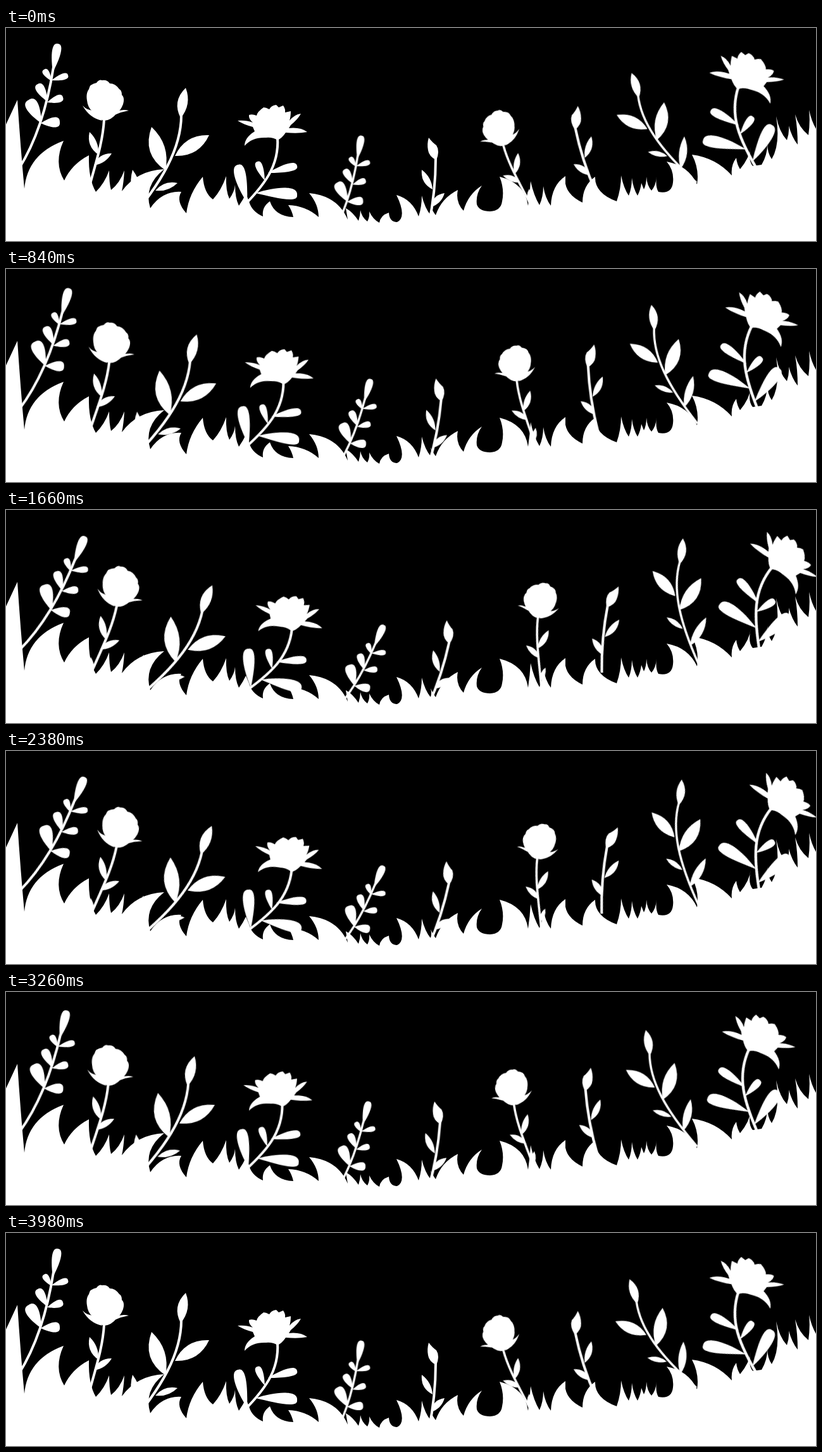
Animation of 1280x338 px, one loop 4000 ms. Source, as an HTML page:

```html
<!DOCTYPE html>
<html lang="en">
<head>
<meta charset="utf-8">
<title>Swaying meadow</title>
<style>
  html, body { margin: 0; width: 100%; height: 100%; overflow: hidden; background: #000; }
  svg { display: block; width: 100%; height: 100%; fill: #fff; }
  .stem { fill: none; stroke: #fff; stroke-width: 4; }
  .plant { animation: sway 4s cubic-bezier(.37, 0, .63, 1) infinite; }
  @keyframes sway {
    0% { transform: rotate(0deg); }
    50% { transform: rotate(var(--lean)); }
    100% { transform: rotate(var(--rest)); }
  }
</style>
</head>
<body>
<svg viewBox="0 0 1280 338">
  <g id="meadow"></g>
  <path d="M0 338V153L18 114Q23 190 29 255Q34 200 91 179Q75 214 92 242Q104 216 131 202Q130 240 142 260Q156 246 163 226Q163 246 166 257Q180 246 187 226Q186 246 183 259Q207 226 250 224Q217 250 228 286Q247 258 277 260Q268 275 285 294Q289 262 311 236Q313 262 327 272Q340 258 348 235Q347 258 353 271Q361 260 362 249Q362 270 368 282Q375 272 379 263L384 275Q388 291 406 299Q404 284 417 275Q425 299 454 300Q452 290 446 281Q474 282 494 300V338Z"/>
  <path d="M494 338V300Q494 280 479 262Q524 266 540 304L537 286Q548 292 557 306Q560 297 560 289Q562 300 571 307Q575 300 574 291Q580 304 590 309Q592 297 605 293Q606 308 618 308Q634 300 617 265Q642 272 652 299Q657 284 657 266Q662 286 671 297Q673 290 671 283Q675 292 679 297Q688 270 714 257Q710 276 723 290Q730 264 752 250Q742 264 744 280Q748 291 765 291Q782 290 784 275Q788 256 780 236Q820 246 825 282Q828 262 829 243Q834 266 843 281Q849 268 849 251Q852 270 861 282Q862 250 884 235V338Z"/>
  <path d="M884 338V235Q880 262 911 277Q911 250 931 236Q930 262 965 275Q972 255 972 234Q976 254 984 266Q989 254 989 238Q991 254 998 266Q1003 256 1004 246L1008 256Q1012 248 1012 236Q1013 250 1020 258Q1027 250 1028 236Q1026 252 1031 260Q1052 264 1054 245Q1056 226 1044 212Q1078 218 1092 248Q1096 224 1084 201Q1122 206 1147 234Q1145 218 1154 206Q1155 216 1160 224Q1175 206 1177 188Q1172 210 1180 219L1194 217Q1204 200 1203 182Q1203 198 1210 208Q1224 185 1217 140Q1222 165 1234 178Q1238 166 1237 155Q1242 174 1251 185Q1251 160 1247 137Q1253 158 1268 170Q1271 150 1269 130Q1273 148 1280 160V338Z"/>
</svg>
<script>
const shape = d => `<path d="${d}"/>`;
const stem = d => `<path class="stem" d="${d}"/>`;

// Point at fraction t of the line a-b, pushed sideways by off.
const beside = (ax, ay, bx, by) => (t, off) => {
  const dx = bx - ax, dy = by - ay, len = Math.hypot(dx, dy);
  return `${ax + dx * t - dy / len * off} ${ay + dy * t + dx / len * off}`;
};

// Leaf with two pointed ends.
function leaf(ax, ay, bx, by, width, bend = 0) {
  const at = beside(ax, ay, bx, by);
  return shape(`M${ax} ${ay}Q${at(.5, bend + width)} ${bx} ${by}Q${at(.5, bend - width)} ${ax} ${ay}Z`);
}

// Leaf with a pointed base and a rounded end.
function pod(ax, ay, bx, by, width, bend = 0) {
  const at = beside(ax, ay, bx, by), w = width * .87;
  return shape(`M${ax} ${ay}C${at(.4, bend + w / 2)} ${at(1.03, bend + w)} ${bx} ${by}C${at(1.03, bend - w)} ${at(.4, bend - w / 2)} ${ax} ${ay}Z`);
}

const sprig = stem('M20 224C50 176 66 120 75 62')
  + pod(74, 70, 82, 25, 14)
  + pod(72, 83, 98, 75, 10) + pod(72, 84, 60, 66, 10)
  + pod(66, 117, 50, 89, 14) + pod(65, 118, 90, 110, 12)
  + pod(56, 151, 36, 114, 20) + pod(55, 151, 85, 149, 16);

const rose = stem('M155 145C153 185 139 222 124 280')
  + shape('M143 87Q147 81 152 83Q160 82 164 88Q173 88 179 97Q183 99 183 106Q188 111 185 121Q181 131 176 134Q166 147 155 147Q144 145 137 133Q129 126 128 115Q126 104 131 97Q132 89 143 87Z')
  + shape('M152 147Q132 143 121 123Q128 131 140 131Z')
  + shape('M158 147Q172 135 194 131Q184 128 173 133Z')
  + leaf(146, 201, 132, 165, 11, -2) + leaf(139, 218, 167, 199, 10, -2)
  + leaf(131, 258, 126, 232, 8);

const twig = stem('M277 138C277 190 248 244 188 314')
  + leaf(276, 143, 284, 95, 16, -2)
  + leaf(252, 226, 230, 157, 24, -4) + leaf(267, 203, 321, 170, 21)
  + leaf(236, 258, 271, 246, 10, -1) + leaf(214, 285, 200, 225, 15, -2);

const lily = stem('M429 174C432 218 410 249 366 292')
  + shape('M366 147Q379 146 390 150Q383 144 384 138Q389 136 396 139Q397 133 407 126Q411 126 416 129Q419 123 427 122L431 126L438 123Q442 129 441 134L450 132Q450 141 448 147Q456 137 466 136Q461 145 450 154L447 159Q465 157 476 165Q462 168 442 166Q436 175 429 178Q421 173 411 174Q389 173 377 187Q377 174 393 164L390 157Q375 153 366 147Z')
  + pod(381, 277, 367, 217, 18, -1) + pod(409, 242, 397, 212, 11)
  + pod(414, 230, 460, 219, 13, -1) + pod(395, 262, 460, 266, 18, -3);

const bud = stem('M679 206Q679 260 668 312')
  + shape('M668 174Q674 182 680 186Q686 195 680 210Q668 203 667 194Q665 184 668 174Z')
  + leaf(674, 256, 657, 225, 10, -2) + leaf(672, 284, 693, 262, 10, -2);

// [art, placing, pivot, lean, rest]
const plants = [
  [sprig, '', '27.5px 228px', 13.5],
  [rose, '', '120px 287px', 8.9],
  [twig, '', '186px 311px', 12.6],
  [lily, '', '357px 314px', 10.6],
  [sprig, 'translate(561 171) scale(.832) translate(-81 -25)', '531px 325px', 14.5],
  [bud, '', '677px 309px', 13],
  [rose, 'translate(786 187) rotate(-12) scale(-.885 .885) translate(-155 -147)', '853px 319px', 23.6],
  [bud, 'translate(925 172) rotate(-11.7) scale(-1.01 1.01) translate(-657 -225)', '942px 283px', 24.3],
  [twig, 'translate(1040 118) rotate(-6.8) scale(-.844 .844) translate(-230 -157)', '1093px 255px', 25, -1],
  [lily, 'translate(1157 95) rotate(14.5) scale(-1.063 1.063) translate(-429 -176)', '1191px 234px', 22.8],
];

document.getElementById('meadow').innerHTML = plants.map(([art, placing, pivot, lean, rest = 0]) =>
  `<g class="plant" style="transform-origin:${pivot};--lean:${lean}deg;--rest:${rest}deg"><g transform="${placing}">${art}</g></g>`
).join('');
</script>
</body>
</html>
```
